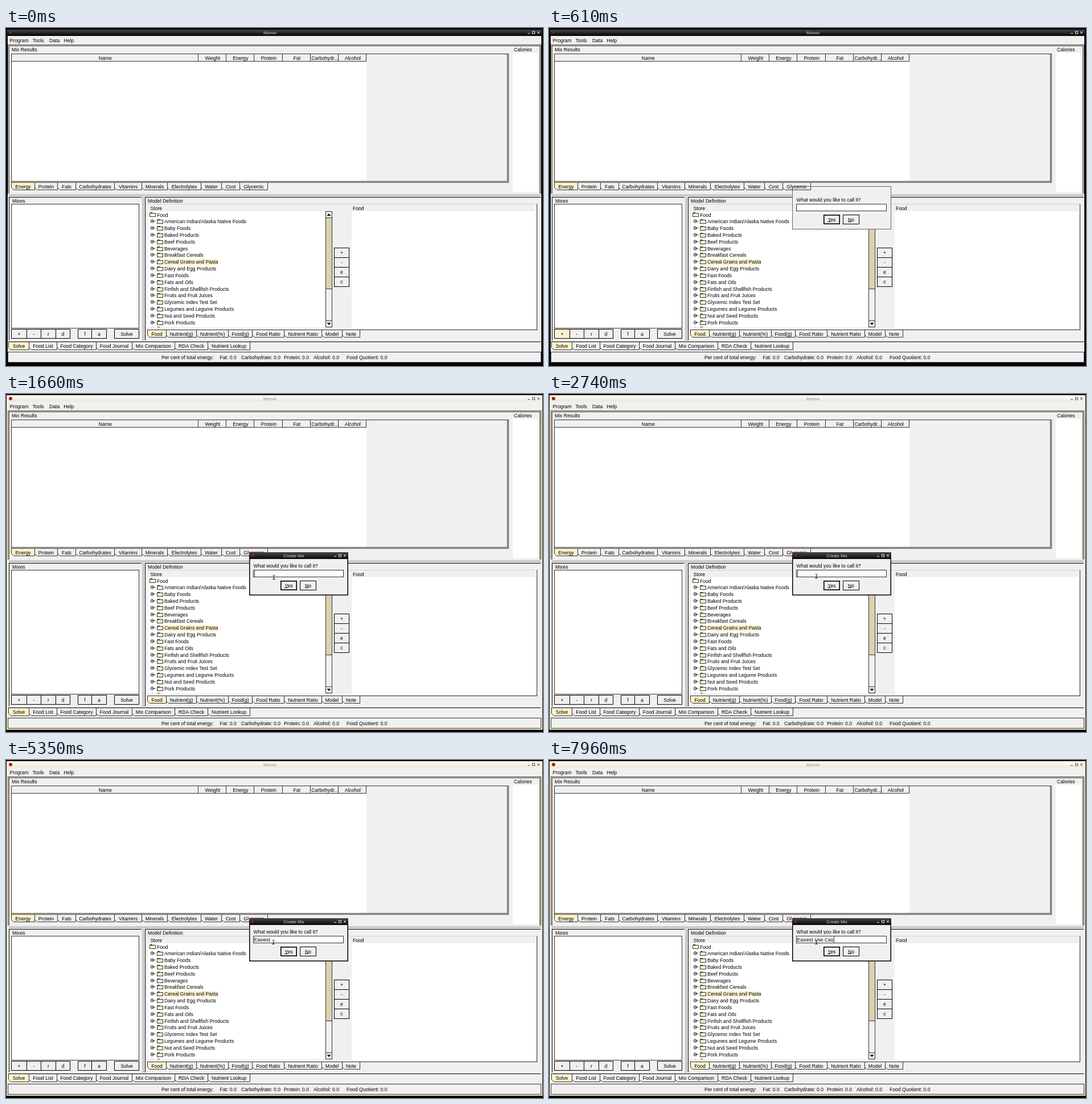
Write an HTML page with a canvas that moves like this. It is 943 px wide and 594 px high and loops after 8 s.

```html
<!DOCTYPE html>
<html lang="en">
<head>
<meta charset="utf-8">
<title>Create mix</title>
<style>
  html, body { margin: 0; width: 100%; height: 100%; overflow: hidden; background: #000; }
  canvas { display: block; }
</style>
</head>
<body>
<canvas id="stage" width="943" height="594"></canvas>
<script>
const ctx = document.getElementById('stage').getContext('2d');
const LOOP = 8000;
const GRAY = '#f0f0f0', CREAM = '#fff3cd', INK = '#000', SOFT = '#333', RED = '#b81414';
const FONT = '8.65px "Liberation Sans", Arial, sans-serif';

const FOODS = ['American Indian/Alaska Native Foods', 'Baby Foods', 'Baked Products',
  'Beef Products', 'Beverages', 'Breakfast Cereals', 'Cereal Grains and Pasta',
  'Dairy and Egg Products', 'Fast Foods', 'Fats and Oils', 'Finfish and Shellfish Products',
  'Fruits and Fruit Juices', 'Glycemic Index Test Set', 'Legumes and Legume Products',
  'Nut and Seed Products', 'Pork Products', ''];
const SELECTED_FOOD = 6;

const NAME = 'Easiest Use Cas';
const KEY_TIMES = [2820, 3280, 3640, 4010, 4360, 4590, 4800, 5520,
  6040, 6450, 6590, 7020, 7530, 7800, 7960];
const CARET_ON = [[1560, 2150], [2740, 5350], [5520, 6000], [6040, 7450], [7530, LOOP]];

function checker(a, b) {
  const tile = document.createElement('canvas');
  tile.width = tile.height = 2;
  const c = tile.getContext('2d');
  c.fillStyle = a;
  c.fillRect(0, 0, 2, 2);
  c.fillStyle = b;
  c.fillRect(0, 0, 1, 1);
  c.fillRect(1, 1, 1, 1);
  return ctx.createPattern(tile, 'repeat');
}
const GRIP = checker('#f4f4f4', '#a0a0a0');
const THUMB = checker('#fff6dc', '#b8ab84');

function fill(x1, y1, x2, y2, color) {
  ctx.fillStyle = color;
  ctx.fillRect(x1, y1, x2 - x1, y2 - y1);
}

function box(x1, y1, x2, y2, color, line = INK, width = 1) {
  fill(x1, y1, x2, y2, line);
  fill(x1 + width, y1 + width, x2 - width, y2 - width, color);
}

// A sunken border: a pale line between two dark ones.
function rim(x1, y1, x2, y2, color) {
  box(x1, y1, x2, y2, '#ece4c4', '#444');
  box(x1 + 2, y1 + 2, x2 - 2, y2 - 2, color, '#444');
}

function text(str, x, midY, align = 'left', color = INK) {
  ctx.font = FONT;
  ctx.textAlign = align;
  ctx.fillStyle = color;
  ctx.fillText(str, x, midY + 3);
}

function disc(x, y, r, color) {
  ctx.fillStyle = color;
  ctx.beginPath();
  ctx.arc(x, y, r, 0, Math.PI * 2);
  ctx.fill();
}

function button(label, x1, y1, x2, y2, color = GRAY, width = 1) {
  box(x1, y1, x2, y2, color, INK, width);
  text(label, (x1 + x2) / 2, (y1 + y2) / 2, 'center');
}

// Tabs hang below a panel, with a slanted lower left corner.
function tabs(labels, edges, top, bottom) {
  labels.forEach((label, i) => {
    const x1 = edges[i] + 0.5, x2 = edges[i + 1] + 0.5, y = bottom - 0.5;
    ctx.beginPath();
    ctx.moveTo(x1, top);
    ctx.lineTo(x1, y - 4);
    ctx.lineTo(x1 + 4, y);
    ctx.lineTo(x2, y);
    ctx.lineTo(x2, top);
    ctx.fillStyle = i ? GRAY : CREAM;
    ctx.fill();
    ctx.strokeStyle = SOFT;
    ctx.lineWidth = 1;
    ctx.stroke();
    text(label, (x1 + x2) / 2, (top + bottom) / 2, 'center');
  });
}

function titleBar(title, x1, y1, x2, y2, active, titleX) {
  const shade = ctx.createLinearGradient(0, y1, 0, y2);
  shade.addColorStop(0, active ? '#484848' : '#fffefa');
  shade.addColorStop(1, active ? '#080808' : '#ede7dc');
  fill(x1, y1, x2, y2, shade);
  const mid = (y1 + y2) / 2;
  disc(x1 + 6, mid, active ? 2 : 3, RED);
  ctx.font = '7.6px "Liberation Sans", Arial, sans-serif';
  ctx.textAlign = 'center';
  ctx.fillStyle = active ? '#d8d8d8' : '#8f8a84';
  ctx.fillText(title, titleX, mid + 2.7);
  const ink = active ? '#e8e8e8' : '#55504a', right = x2 - 6;
  fill(right - 19, mid + 1, right - 15, mid + 2, ink);
  ctx.strokeStyle = ink;
  ctx.lineWidth = 1;
  ctx.strokeRect(right - 10.5, mid - 2, 4, 4);
  ctx.beginPath();
  ctx.moveTo(right - 2, mid - 2);
  ctx.lineTo(right + 2, mid + 2);
  ctx.moveTo(right + 2, mid - 2);
  ctx.lineTo(right - 2, mid + 2);
  ctx.stroke();
}

function frame(active) {
  fill(0, 0, 943, 594, INK);
  fill(1, 2, 942, 590, active ? '#0c0c0c' : '#fbf0cc');
  fill(3, 14, 940, 588, GRAY);
  titleBar('Munvo', 2, 3, 941, 13, active, 463.5);
  ['Program', 'Tools', 'Data', 'Help'].forEach((item, i) =>
    text(item, [6.5, 46.5, 76, 101.5][i], 22));
}

function results() {
  rim(3, 29, 940, 294, GRAY);
  text('Mix Results', 10, 38);
  box(9, 45, 883, 272, '#ece4c4', '#444');
  box(9, 45, 881, 270, GRAY, SOFT);
  fill(10, 59, 633, 269, '#fff');
  const edges = [9, 337, 386, 435, 485, 534, 583, 632];
  ['Name', 'Weight', 'Energy', 'Protein', 'Fat', 'Carbohydr...', 'Alcohol'].forEach((head, i) => {
    box(edges[i], 45, edges[i + 1] + 1, 59, GRAY, SOFT);
    text(head, (edges[i] + edges[i + 1]) / 2 + 1.3, 52.5, 'center');
  });
  tabs(['Energy', 'Protein', 'Fats', 'Carbohydrates', 'Vitamins', 'Minerals', 'Electrolytes',
    'Water', 'Cost', 'Glycemic'], [9, 50, 90, 122, 190, 238, 283, 342, 378, 410, 459], 272, 285);
  text('Calories', 892, 38);
  fill(890, 44, 934, 288, '#fff');
}

function mixes(pressed) {
  fill(3, 291, 940, 297, GRAY);
  fill(5, 292, 939, 296, GRIP);
  fill(239, 297, 243, 550, GRIP);
  fill(5, 297, 238, 298, INK);
  fill(5, 297, 6, 549, INK);
  text('Mixes', 11, 303.5);
  box(9, 309, 234, 528, '#fff', SOFT);
  const edges = [9, 36, 61, 87, 112];
  ['+', '-', 'r', 'd'].forEach((label, i) =>
    button(label, edges[i], 529, edges[i + 1] + 1, 546, !i && pressed ? CREAM : GRAY));
  button('f', 126, 529, 151, 546);
  button('a', 150, 529, 177, 546);
  button('Solve', 190, 529, 234, 546);
}

function folder(x, y) {
  fill(x + 1, y - 3, x + 5, y - 2, SOFT);
  box(x, y - 2, x + 11, y + 5, CREAM, SOFT);
}

function tree() {
  fill(249, 322, 561, 526, '#fff');
  ctx.save();
  ctx.beginPath();
  ctx.rect(249, 322, 312, 204);
  ctx.clip();
  folder(252, 327);
  text('Food', 265, 328.5);
  FOODS.forEach((food, i) => {
    const y = 328.5 + 11.82 * (i + 1), row = Math.round(y - 1);
    if (i === SELECTED_FOOD) fill(277, row - 4, 372, row + 7, CREAM);
    disc(256.7, row + 0.5, 2.9, SOFT);
    disc(256.7, row + 0.5, 1.9, '#e8e8e8');
    fill(256, row, 262, row + 1, SOFT);
    folder(265, row);
    text(food, 278, y);
  });
  ctx.restore();
}

function arrow(y, dir) {
  ctx.fillStyle = INK;
  ctx.beginPath();
  ctx.moveTo(563.5, y + 2 * dir);
  ctx.lineTo(570.5, y + 2 * dir);
  ctx.lineTo(567, y - 2 * dir);
  ctx.fill();
}

function model() {
  fill(244, 297, 939, 298, INK);
  fill(244, 297, 245, 549, INK);
  text('Model Definition', 249, 303.5);
  text('Store', 253.5, 316.5);
  text('Food', 609, 316.5);
  fill(248, 309, 932, 310, '#d0d0d0');
  fill(932, 309, 933, 531, SOFT);
  fill(248, 530, 933, 531, SOFT);
  tree();
  box(561, 322, 573, 526, GRAY, SOFT);
  box(561, 322, 573, 334, GRAY, SOFT);
  box(561, 333, 573, 459, THUMB, SOFT);
  box(561, 514, 573, 526, GRAY, SOFT);
  arrow(328, 1);
  arrow(520, -1);
  ['+', '-', 'e', 'c'].forEach((label, i) =>
    button(label, 576, 386 + 17 * i, 603, 404 + 17 * i));
  fill(607, 322, 929, 528, '#fff');
  tabs(['Food', 'Nutrient(g)', 'Nutrient(%)', 'Food(g)', 'Food Ratio', 'Nutrient Ratio', 'Model',
    'Note'], [248, 281, 334, 390, 432, 488, 554, 590, 621], 531, 544);
}

function footer() {
  fill(4, 551, 939, 552, INK);
  tabs(['Solve', 'Food List', 'Food Category', 'Food Journal', 'Mix Comparison', 'RDA Check',
    'Nutrient Lookup'], [4, 40, 89, 158, 221, 296, 354, 428], 552, 566);
  box(3, 569, 940, 588, GRAY, SOFT);
  ['Per cent of total energy:', 'Fat: 0.0', 'Carbohydrate: 0.0', 'Protein: 0.0', 'Alcohol: 0.0',
    'Food Quotient: 0.0'].forEach((item, i) =>
    text(item, [273, 375.5, 413, 488, 540, 598][i], 579));
}

function dialogFrame(active) {
  if (active) {
    box(427, 278, 601, 354, GRAY, INK, 1.5);
    titleBar('Create Mix', 427, 278, 601, 290, true, 505.5);
    return;
  }
  fill(427, 290, 600, 353, GRAY);
  ctx.strokeStyle = '#666';
  ctx.lineWidth = 1;
  ctx.strokeRect(427.5, 278.5, 173, 75);
}

function dialogBody(t) {
  text('What would you like to call it?', 434.5, 302);
  box(434, 309, 593, 322, '#fff', SOFT);
  button('Yes', 482, 328, 511, 345, GRAY, 1.6);
  button('No', 516, 328, 545, 345);
  fill(489, 340, 495, 341, INK);
  fill(525, 340, 531, 341, INK);

  const typed = NAME.slice(0, KEY_TIMES.filter(k => t >= k).length);
  text(typed, 435.5, 315.5);
  if (CARET_ON.some(([from, to]) => t >= from && t < to)) {
    const x = Math.floor(436.3 + ctx.measureText(typed).width);
    fill(x, 310, x + 1, 321, SOFT);
  }
  if (t >= 1430) pointer(Math.min(1, (t - 1430) / 720));
}

function pointer(progress) {
  const rest = (1 - progress) ** 2;
  const x = Math.round(469 + 3 * rest), y = Math.round(316 + 4 * rest);
  fill(x, y, x + 1, y + 7, '#222');
  fill(x - 2, y, x + 3, y + 1, '#777');
  fill(x - 2, y + 7, x + 3, y + 8, '#222');
}

function draw(now) {
  const t = now % LOOP;
  const ready = t >= 670;
  frame(!ready);
  results();
  mixes(t >= 500 && !ready);
  model();
  footer();
  if (t >= 560) dialogFrame(ready);
  if (t >= 610) dialogBody(t);
}

const start = performance.now();
function tick() {
  draw(performance.now() - start);
  requestAnimationFrame(tick);
}
tick();
</script>
</body>
</html>
```
